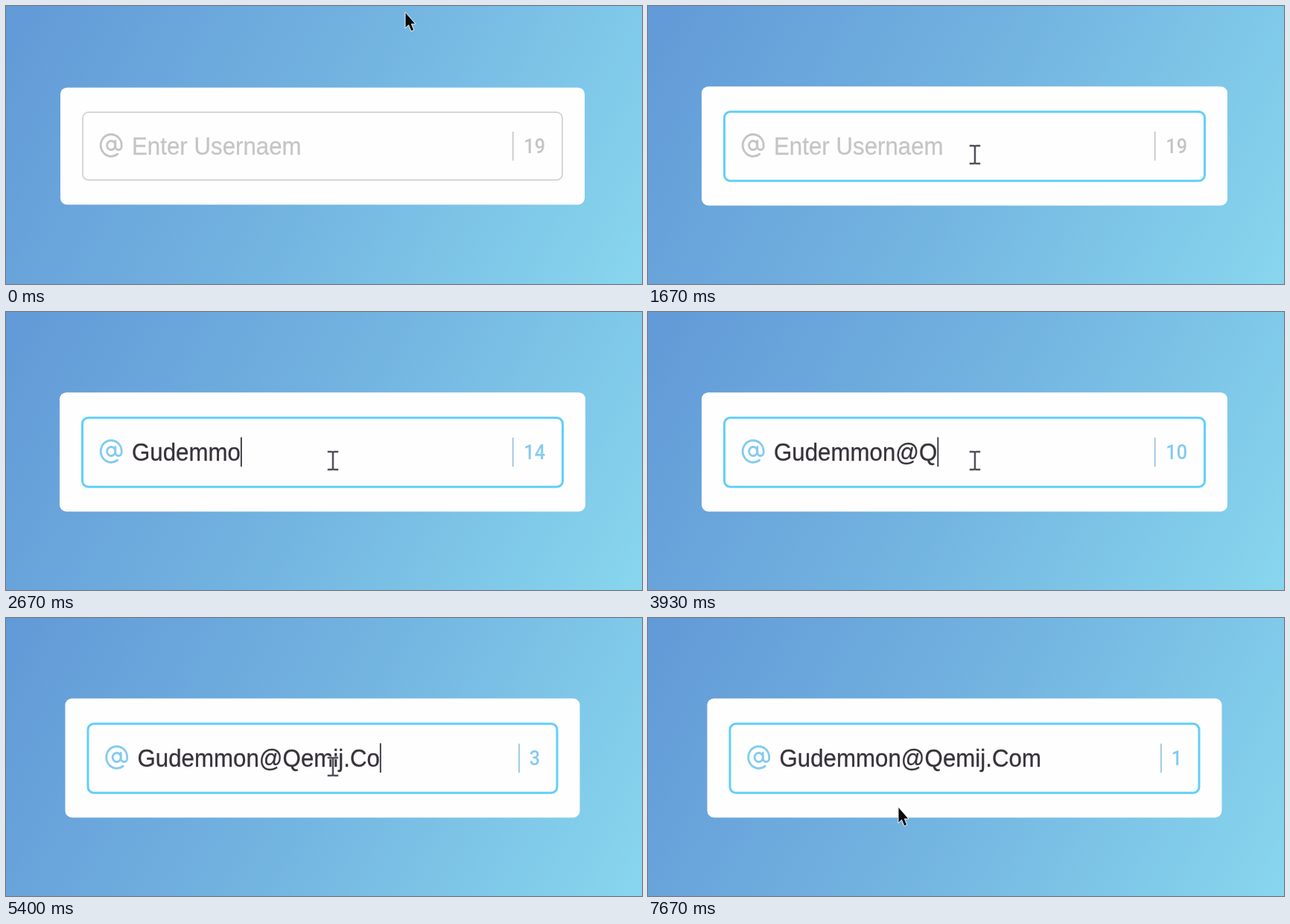
Write an HTML page that moves like this. It is 854 px wide and 374 px high and loops after 8 s.

```html
<!DOCTYPE html>
<html lang="en">
<head>
<meta charset="utf-8">
<title>Username field with character counter</title>
<style>
  html, body { margin: 0; width: 100%; height: 100%; overflow: hidden; }
  body { background: linear-gradient(118deg, #6299d7, #72b3e0 48%, #88d6ee); }
  svg { display: block; width: 100%; height: 100%; }
  text { white-space: pre; }
  #value { font: 34px "Liberation Sans", Arial, sans-serif; stroke-width: .3; }
  #count { font: 500 27.5px Roboto, "Liberation Sans", sans-serif; }
</style>
</head>
<body>
<svg viewBox="0 0 854 374">
  <rect id="card" rx="9" fill="#fefefe"/>
  <rect id="field" rx="8" fill="none"/>
  <g id="icon" fill="none" stroke-width="2" stroke-linecap="round" stroke-linejoin="round">
    <circle r="4"/>
    <path d="M4-4v5a3 3 0 0 0 6 0v-1a10 10 0 1 0-3.92 7.94"/>
  </g>
  <text id="value"></text>
  <rect id="caret" y="168.5" width="1.8" height="39.5" fill="#33333c"/>
  <rect id="divider" y="169" width="1.8" height="39"/>
  <text id="count"></text>
  <g id="beam" fill="none" stroke-linecap="square">
    <path id="bar" d="M-6-12h4q2 0 2 2v20q0 2-2 2h-4M6-12h-4q-2 0-2 2M6 12h-4q-2 0-2-2"/>
  </g>
  <path id="arrow" d="M0 0V22L4.6 17.6L8 26L11.8 24.2L8.4 16.2H14Z"
        fill="#0c0c0c" stroke="#f4f8fb" stroke-width="1" stroke-linejoin="round"/>
</svg>
<script>
const LOOP = 8000;
const LIMIT = 19;
const SQUEEZE = .92;
const FOCUS = 1055;
const KEY_PACE = 150;   // between keys in a burst
const COUNT_LAG = 160;  // counter updates on key release
const BLINK = 610;

const bursts = [[1765, "Gudemmon"], [3530, "@"], [3925, "Q"],
                [4070, "emij"], [4930, "."], [5235, "Com"]];
const keys = bursts.flatMap(([start, word]) =>
  [...word].map((char, i) => ({ char, at: start + i * KEY_PACE })));

// [time, x, y] the pointer eases between
const route = [[580, 536, 8], [730, 476, 185], [870, 476, 185], [930, 439, 200],
               [6620, 439, 200], [6870, 341, 204], [7130, 288, 34], [7470, 336, 254]];

const $ = id => document.getElementById(id);
const set = (id, attrs) => {
  for (const key in attrs) $(id).setAttribute(key, attrs[key]);
};
const box = (id, left, top, right, bottom) =>
  set(id, { x: left, y: top, width: right - left, height: bottom - top });
const place = (id, x, y, sx = 1, sy = 1) =>
  set(id, { transform: `translate(${x} ${y}) scale(${sx} ${sy})` });
const pressed = t => keys.filter(key => key.at <= t);

function pointer(t) {
  const next = route.findIndex(point => point[0] > t);
  if (next < 1) return (next ? route.at(-1) : route[0]).slice(1);
  const [t0, ...from] = route[next - 1];
  const [t1, ...to] = route[next];
  const p = (t - t0) / (t1 - t0);
  const ease = p * p * (3 - 2 * p);
  return from.map((v, i) => v + (to[i] - v) * ease);
}

// Light halo under the text cursor
const halo = $("bar").cloneNode();
halo.removeAttribute("id");
halo.setAttribute("stroke", "#fff");
halo.setAttribute("stroke-width", 4.4);
halo.setAttribute("opacity", .65);
$("beam").prepend(halo);
set("bar", { stroke: "#50525a", "stroke-width": 2.5 });

function draw(t) {
  const focused = t >= FOCUS;
  const done = pressed(t);
  const left = LIMIT - pressed(t - COUNT_LAG).length;
  const active = left < LIMIT;
  const shift = left < 10 ? 7.5 : 0;  // the card narrows with a one-digit count
  const grow = focused ? 1 : 0;
  const tint = active ? "#84cbf0" : "#c4c4c7";

  box("card", 73 - grow + shift, 109.7 - 1.5 * grow, 777 + grow - shift, 267.3 + 1.2 * grow);
  box("field", 103 - grow / 2 + shift, 142.8 - grow / 2, 747 + grow / 2 - shift, 234.2 + grow);
  set("field", {
    stroke: focused ? "#62cffa" : "#d0d1d3",
    "stroke-width": focused ? 3 : 1.7
  });

  place("icon", 141.2 + shift, 187.5, 1.4, 1.48);
  set("icon", { stroke: tint });

  const start = 169 + shift;
  const ink = done.length ? "#37323a" : "#c5c5c8";
  $("value").textContent = done.map(key => key.char).join("") || "Enter Usernaem";
  place("value", start, 199.8, SQUEEZE);
  set("value", { fill: ink, stroke: ink });

  const width = done.length ? $("value").getComputedTextLength() * SQUEEZE : 0;
  const idle = t - (done.length ? done.at(-1).at : FOCUS);
  const lit = focused && Math.floor(idle / BLINK) % 2 === 0;
  set("caret", { x: start + width, visibility: lit ? "visible" : "hidden" });

  set("divider", { x: 679.8 + shift * 1.1, fill: active ? "#9cc6e2" : "#c8c8ca" });
  $("count").textContent = left;
  place("count", 695.3 + shift, 197.6, SQUEEZE);
  set("count", { fill: tint });

  const [x, y] = pointer(t);
  const inField = x > 103 && x < 748 && y > 142 && y < 235;
  place("beam", x, y);
  place("arrow", x, y);
  set("beam", { visibility: inField ? "visible" : "hidden" });
  set("arrow", { visibility: inField ? "hidden" : "visible" });
}

const begin = performance.now();
function tick() {
  draw((performance.now() - begin) % LOOP);
  requestAnimationFrame(tick);
}
tick();
</script>
</body>
</html>
```
